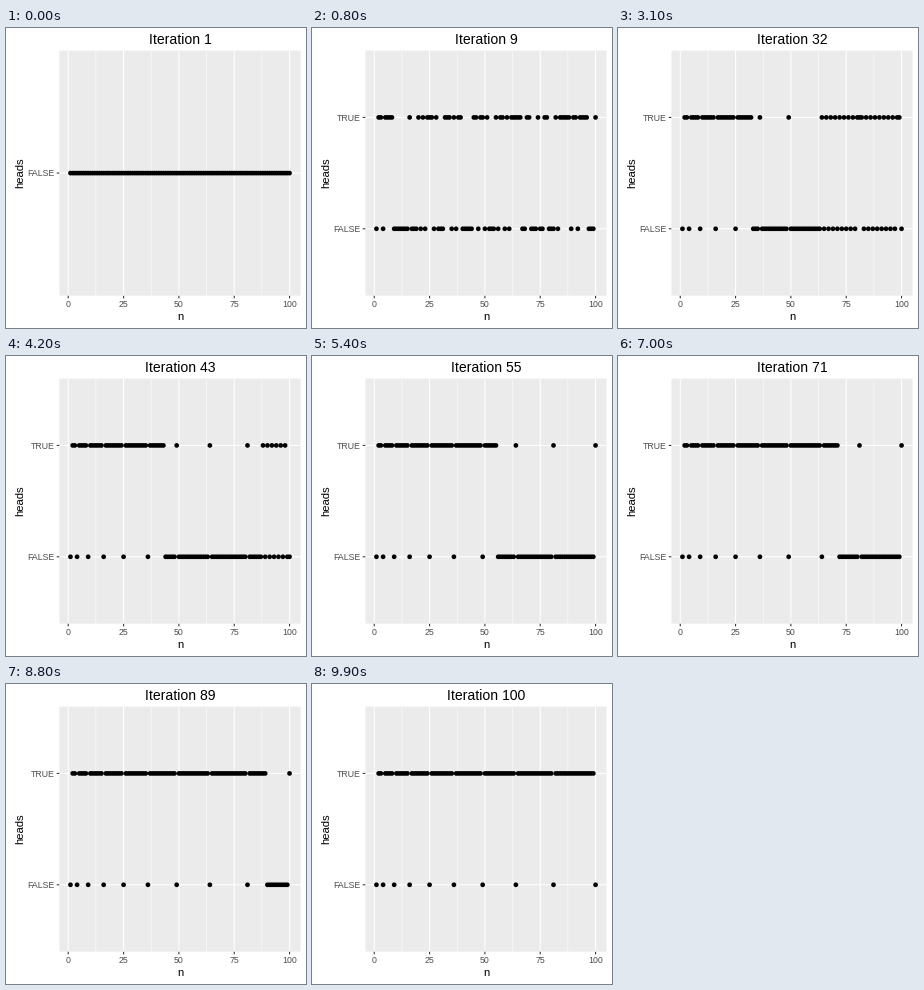
Recreate the animation shown at these times as a matplotlib script. Size 300 by 300 pixels, loop 10000 ms.

```python
import matplotlib.pyplot as plt
from matplotlib.animation import FuncAnimation
from matplotlib.patches import Circle, Rectangle

plt.rcParams["font.family"] = "Liberation Sans"

SIZE, DPI = 300, 72          # at 72 dpi one point is one pixel
COINS = 100
LEFT, RIGHT, TOP, BOTTOM = 53.5, 294.5, 22.6, 267.6
GREY_TEXT, GREY_TICK = "#4d4d4d", "#333333"
RADIUS, TICK = 2.35, 2.74

MID_Y = (TOP + BOTTOM) / 2
STEP_Y = (BOTTOM - TOP) / 2.2
TRUE_Y, FALSE_Y = MID_Y - STEP_Y / 2, MID_Y + STEP_Y / 2


def px(n):
    """Horizontal position of coin n; the data range is padded by 5 %."""
    pad = 0.05 * (COINS - 1)
    return LEFT + (n - 1 + pad) / (COINS - 1 + 2 * pad) * (RIGHT - LEFT)


fig = plt.figure(figsize=(SIZE / DPI, SIZE / DPI), dpi=DPI, facecolor="white")
ax = fig.add_axes([0, 0, 1, 1])
ax.set_xlim(0, SIZE)
ax.set_ylim(SIZE, 0)
ax.axis("off")


def line(x, y, color="white", width=1.07, z=2):
    return ax.plot(x, y, color=color, lw=width, zorder=z, snap=False,
                   solid_capstyle="butt")[0]


def label(x, y, s, size, color="black", ha="center", **kw):
    return ax.text(x, y, s, fontsize=size, color=color, ha=ha,
                   va="baseline", **kw)


# Panel, vertical grid and x axis
ax.add_patch(Rectangle((LEFT, TOP), RIGHT - LEFT, BOTTOM - TOP,
                       fc="#ebebeb", lw=0, zorder=1, snap=False))
for i in range(4):
    x = px(12.5 + 25 * i)
    line([x, x], [TOP, BOTTOM], width=0.53)
for n in range(0, 101, 25):
    x = px(n)
    line([x, x], [TOP, BOTTOM], z=3)
    line([x, x], [BOTTOM, BOTTOM + TICK], GREY_TICK)
    label(x, 279.4, str(n), 8.8, GREY_TEXT)

center = (LEFT + RIGHT) / 2
title = label(center, 15.8, "", 14)
label(center, 292, "n", 11.3)
label(17, MID_Y, "heads", 11.3, rotation=90, rotation_mode="anchor")


def level(name, y):
    """Grid line, tick and label of one category."""
    return [line([LEFT, RIGHT], [y, y], z=3),
            line([LEFT - TICK, LEFT], [y, y], GREY_TICK),
            label(48.4, y + 3.1, name, 8.8, GREY_TEXT, "right")]


single = level("FALSE", MID_Y)
double = level("TRUE", TRUE_Y) + level("FALSE", FALSE_Y)
dots = [ax.add_patch(Circle((px(n), MID_Y), RADIUS, fc="black", lw=0, zorder=5))
        for n in range(1, COINS + 1)]


def is_heads(n, rounds):
    """Each round k turns over every k-th coin; all start as heads."""
    return sum(n % k == 0 for k in range(1, rounds + 1)) % 2 == 0


def update(frame):
    rounds = frame + 1
    title.set_text(f"Iteration {rounds}")
    first = rounds == 1
    for artist in single:
        artist.set_visible(first)
    for artist in double:
        artist.set_visible(not first)
    for n, dot in enumerate(dots, 1):
        y = MID_Y if first else TRUE_Y if is_heads(n, rounds) else FALSE_Y
        dot.center = px(n), y
    return [title, *single, *double, *dots]


anim = FuncAnimation(fig, update, frames=COINS, interval=100,
                     repeat=True, repeat_delay=0, blit=False)
plt.show()
```
